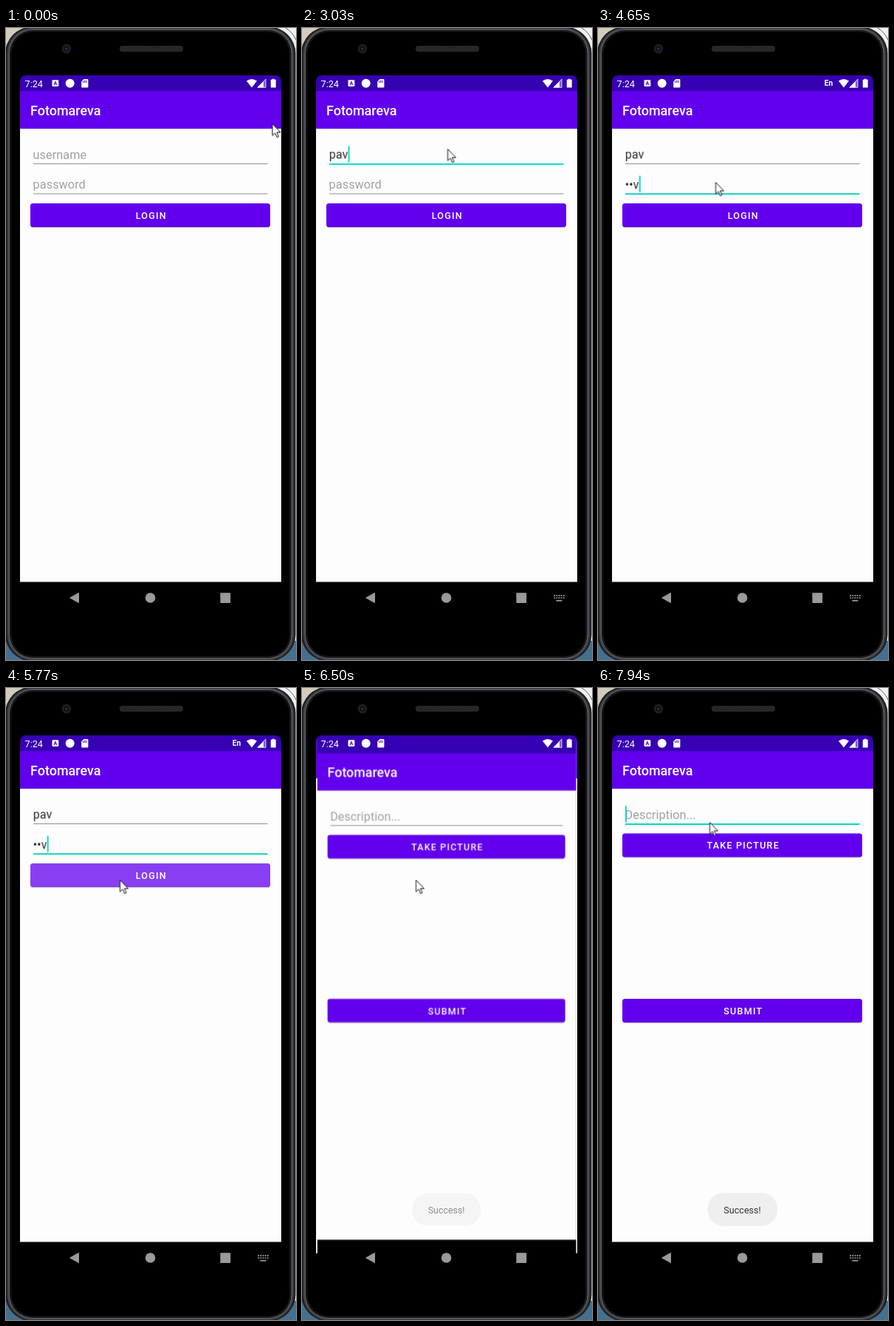
These frames come from a looping animation (393 px wide and 854 px high, 8000 ms). An HTML page:

```html
<!DOCTYPE html>
<html lang="en">
<head>
<meta charset="utf-8">
<title>Phone login</title>
<style>
html, body { margin: 0; width: 100%; height: 100%; overflow: hidden; background: #fff; }
svg { display: block; width: 393px; height: 854px; font-family: Roboto, sans-serif; }
.title { font-size: 18px; font-weight: 500; fill: #fff; }
.label { font-size: 12.6px; font-weight: 500; letter-spacing: 1.2px; fill: #fff; text-anchor: middle; }
.input { font-size: 16.23px; fill: #2b2b2b; }
.hint { font-size: 16.23px; fill: #a0a0a0; letter-spacing: .08px; }
.line { fill: #8f8f8f; }
.teal { fill: #03dac5; }
.btn { fill: #6200ee; }
.shade { fill: #000; opacity: .2; }

/* Every animation shares one 8 s clock and holds each value until the next key. */
.a { animation: 8s step-end infinite; }
.off { opacity: 0; }
.win { transform-origin: 196px 428px; }

#mouse { animation-name: mouse; transform: translate(361px, 129.5px); }
@keyframes mouse {
  12% { transform: translate(350px, 138px); }
  13.5% { transform: translate(333px, 153px); }
  15% { transform: translate(306.5px, 168.5px); opacity: 1; }
  16.5% { opacity: 0; }
  18.375% { transform: translate(250px, 232.5px); opacity: 1; }
  19.875% { transform: translate(222px, 194px); }
  21.375% { transform: translate(204.5px, 168.5px); }
  23.375% { transform: translate(197.5px, 163.5px); }
  44.875% { transform: translate(190px, 174px); }
  46.375% { transform: translate(172px, 196px); }
  47.875% { transform: translate(159.5px, 208.5px); }
  65% { transform: translate(158.5px, 219.5px); }
  66.875% { transform: translate(156px, 238px); }
  68.375% { transform: translate(154.5px, 254px); }
  70.25% { transform: translate(154.5px, 259.5px); }
  87.25% { transform: translate(206px, 258px); }
  88.75% { transform: translate(240px, 254px); }
  90.75% { transform: translate(190.5px, 196.5px); }
  92.5% { transform: translate(176px, 190px); }
  94% { transform: translate(160px, 184px); }
  95.5%, 100% { transform: translate(151.5px, 181.5px); }
}

#keys { animation-name: keys; }
@keyframes keys { 26.75% { opacity: 1; } 81.25% { opacity: 0; } 99.25%, 100% { opacity: 1; } }
#lang { animation-name: lang; }
@keyframes lang { 53.125% { opacity: .6; } 55% { opacity: 1; } 81.25%, 100% { opacity: 0; } }

#userHint { animation-name: userHint; }
@keyframes userHint { 36.125%, 100% { opacity: 0; } }
#userStart { animation-name: userStart; }
@keyframes userStart { 36.125%, 100% { opacity: 1; } }
#userEnd { animation-name: userEnd; }
@keyframes userEnd { 37.875%, 100% { opacity: 1; } }
#userLine { animation-name: userLine; }
@keyframes userLine { 26.75% { opacity: 1; } 49.75%, 100% { opacity: 0; } }
#userCaret { animation-name: userCaret; }
@keyframes userCaret {
  26.75% { opacity: 1; transform: none; }
  32.25% { opacity: 0; }
  36.125% { opacity: 1; transform: translateX(17.8px); }
  37.875% { opacity: 1; transform: translateX(25.6px); }
  44.875%, 100% { opacity: 0; }
}

#passHint { animation-name: passHint; }
@keyframes passHint { 55%, 100% { opacity: 0; } }
#pass1 { animation-name: pass1; }
@keyframes pass1 { 55% { opacity: 1; } 56.5%, 100% { opacity: 0; } }
#pass2 { animation-name: pass2; }
@keyframes pass2 { 56.5% { opacity: 1; } 58.125%, 100% { opacity: 0; } }
#pass3 { animation-name: pass3; }
@keyframes pass3 { 58.125% { opacity: 1; } 75.875%, 100% { opacity: 0; } }
#pass4 { animation-name: pass4; }
@keyframes pass4 { 75.875%, 100% { opacity: 1; } }
#passLine { animation-name: passLine; }
@keyframes passLine { 49.75%, 100% { opacity: 1; } }
#passCaret { animation-name: passCaret; }
@keyframes passCaret {
  49.75% { opacity: 1; transform: none; }
  55% { transform: translateX(9px); }
  56.5% { transform: translateX(14.2px); }
  58.125% { transform: translateX(18.8px); }
  65% { opacity: 0; }
  70.25% { opacity: 1; }
  75.875%, 100% { opacity: 0; transform: translateX(18.8px); }
}

#press { animation-name: press; fill: #fff; }
@keyframes press { 70.25% { opacity: .14; } 72.125% { opacity: .25; } 74.125%, 100% { opacity: 0; } }

#login { animation-name: login; }
@keyframes login { 79.375% { transform: scale(1.004); } 81.25% { transform: scale(1.048); } 82.75%, 100% { transform: scale(1.1); } }
#post { animation-name: post; }
@keyframes post {
  81.25% { opacity: 1; transform: scale(.991); }
  82.75% { opacity: 1; transform: scale(.995); }
  84.25% { opacity: 1; transform: scale(.998); }
  85.75%, 100% { opacity: 1; transform: none; }
}
#toast { animation-name: toast; transform-origin: 196px 704.5px; }
@keyframes toast {
  81.25% { opacity: .55; transform: scale(.985); }
  82.75% { opacity: .8; transform: scale(.993); }
  84.25%, 100% { opacity: 1; transform: none; }
}
#postFocus { animation-name: postFocus; }
@keyframes postFocus { 97.5%, 100% { opacity: 1; } }
</style>
</head>
<body>
<svg viewBox="0 0 393 854">
  <defs>
    <clipPath id="screen"><path d="M19 792V73Q19 64 28 64H364Q373 64 373 73V792Z"/></clipPath>
    <pattern id="mesh" width="3" height="3" patternUnits="userSpaceOnUse">
      <path d="M0 0H3V3H0Z" fill="#1d1d1f"/><path d="M0 0H1.5V1.5H0ZM1.5 1.5H3V3H1.5Z" fill="#303033"/>
    </pattern>
    <!-- Window backdrop: status strip, app bar, page, navigation strip -->
    <g id="frame">
      <path d="M19 64H373V792H19Z" fill="#000"/>
      <path d="M19 64H373V748.4H19Z" fill="#fdfdfd"/>
      <path d="M19 64H373V86H19Z" fill="#3700b3"/>
      <path d="M19 136H373V137H19Z" fill="#000" opacity=".08"/>
      <path d="M19 85.3H373V136H19Z" class="btn"/>
      <text x="33" y="117.8" class="title">Fotomareva</text>
    </g>
    <g id="button">
      <rect x="33.3" y="1.2" width="324.4" height="32" rx="3.5" class="shade"/>
      <rect x="33" width="325" height="32" rx="3.5" class="btn"/>
    </g>
    <path id="thin" d="M37 0H354.5V1H37Z"/>
    <path id="thick" d="M37 0H354.5V1.9H37Z"/>
    <path id="caret" d="M37 0H38.8V22.5H37Z"/>
  </defs>

  <!-- Desktop behind the phone -->
  <path d="M0 0H60V60H0Z" fill="#d3ccbd"/>
  <path d="M340 0H393V60H340Z" fill="#f0f0ee"/>
  <path d="M379 0Q388 5 393 16" fill="none" stroke="#666" stroke-width="1"/>
  <path d="M0 828H393V854H0Z" fill="#44708d"/>

  <!-- Phone body -->
  <rect x="-1" y="-1.5" width="393.5" height="857" rx="36" fill="#1f2023"/>
  <g fill="#000">
    <rect x="3.5" y="1.5" width="384.5" height="851" rx="33" stroke="#434448" stroke-width="3.6"/>
    <rect x="4.5" y="2.5" width="382.5" height="849" rx="32" stroke="#66676c" stroke-width="1"/>
    <rect x="6.5" y="4.5" width="378.5" height="845" rx="30" stroke="#1c1d1f" stroke-width="1.5"/>
  </g>
  <circle cx="82" cy="28" r="6.3" fill="#1d1f22"/>
  <circle cx="82" cy="28" r="3.6" fill="#0b1015"/>
  <circle cx="82" cy="28" r="1.6" fill="#2b3b49"/>
  <rect x="154" y="24" width="86" height="8" rx="3.5" fill="url(#mesh)"/>

  <g clip-path="url(#screen)">
    <g id="login" class="a win">
      <use href="#frame"/>
      <text id="userHint" class="a hint" x="36.6" y="176.6">username</text>
      <text id="userStart" class="a off input" x="36.6" y="176.6">pa</text>
      <text id="userEnd" class="a off input" x="54.5" y="176.6">v</text>
      <use href="#thin" y="183" class="line"/>
      <use id="userLine" href="#thick" y="183" class="a off teal"/>
      <use id="userCaret" href="#caret" y="159.3" class="a off teal"/>

      <text id="passHint" class="a hint" x="36.6" y="217">password</text>
      <text id="pass1" class="a off input" x="36.6" y="217">p</text>
      <text id="pass2" class="a off input" x="36.6" y="217">•a</text>
      <text id="pass3" class="a off input" x="36.6" y="217">••v</text>
      <text id="pass4" class="a off input" x="36.6" y="217">•••</text>
      <use href="#thin" y="223.4" class="line"/>
      <use id="passLine" href="#thick" y="223.5" class="a off teal"/>
      <use id="passCaret" href="#caret" y="199.6" class="a off teal"/>

      <use href="#button" y="237"/>
      <rect id="press" class="a off" x="33" y="237" width="325" height="32" rx="3.5"/>
      <text x="196.8" y="258" class="label">LOGIN</text>
    </g>

    <g id="post" class="a off win">
      <use href="#frame"/>
      <text class="hint" x="36.6" y="176.6">Description...</text>
      <use href="#thin" y="183" class="line"/>
      <g id="postFocus" class="a off teal">
        <use href="#thick" y="183"/>
        <use href="#caret" y="159.3"/>
      </g>
      <use href="#button" y="196.5"/>
      <text x="196.8" y="217.4" class="label">TAKE PICTURE</text>
      <use href="#button" y="420"/>
      <text x="196.8" y="441" class="label">SUBMIT</text>
    </g>

    <g id="toast" class="a off">
      <rect x="148.7" y="682.3" width="94.4" height="44.6" rx="21" fill="#efefef"/>
      <text x="195.6" y="710" font-size="12.6" fill="#333" text-anchor="middle">Success!</text>
    </g>
  </g>

  <!-- Status icons -->
  <g fill="#fff">
    <text x="25.5" y="79.5" font-size="12.7">7:24</text>
    <rect x="62.5" y="70.3" width="8.8" height="8.8" rx="1"/>
    <text x="66.9" y="77.3" font-size="7" font-weight="700" text-anchor="middle" fill="#3700b3">A</text>
    <circle cx="86.7" cy="74.7" r="6"/>
    <path d="M105.5 69H110.3Q111.4 69 111.4 70V79.6Q111.4 80.6 110.3 80.6H103.2Q102.2 80.6 102.2 79.6V72.3Z"/>
    <path d="M104.6 71.5V74M106.7 70.7V74M108.8 70.7V74" stroke="#3700b3" stroke-width="1"/>
    <path d="M326 71.6Q333 66.3 340 71.6L333 80.4Z"/>
    <path d="M341 80.3L352 69.2V80.3Z" opacity=".35"/>
    <path d="M341 80.3L349 72.2V80.3Z"/>
    <path d="M341 80.3L352 69.2V80.3Z" fill="none" stroke="#fff" stroke-width=".8"/>
    <path d="M360.7 69.8V68.7H363.7V69.8H365.7V80.6H358.8V69.8Z"/>
    <text id="lang" class="a off" x="306.7" y="78" font-size="10.3" font-weight="700">En</text>
  </g>

  <!-- Navigation keys -->
  <g fill="#9a9a9a">
    <path d="M87 770L98.3 763.8V776.2Z" stroke="#9a9a9a" stroke-width="1.4" stroke-linejoin="round"/>
    <circle cx="195.6" cy="770" r="6.8"/>
    <rect x="290.4" y="763.2" width="13.8" height="13.8" rx="1"/>
    <g id="keys" class="a off" fill="none" stroke="#929292">
      <path d="M341.3 767H356M341.3 770.2H356" stroke-width="1.8" stroke-dasharray="1.8 1.35"/>
      <path d="M344.5 773.8H352.5" stroke-width="1.8"/>
    </g>
  </g>

  <path id="mouse" class="a" d="M0 0V15.8L3.6 12.4L6.2 18.3L8.5 17.3L6 11.6H11Z" fill="#fff" stroke="#111" stroke-width="1" stroke-linejoin="round"/>
</svg>
</body>
</html>
```
